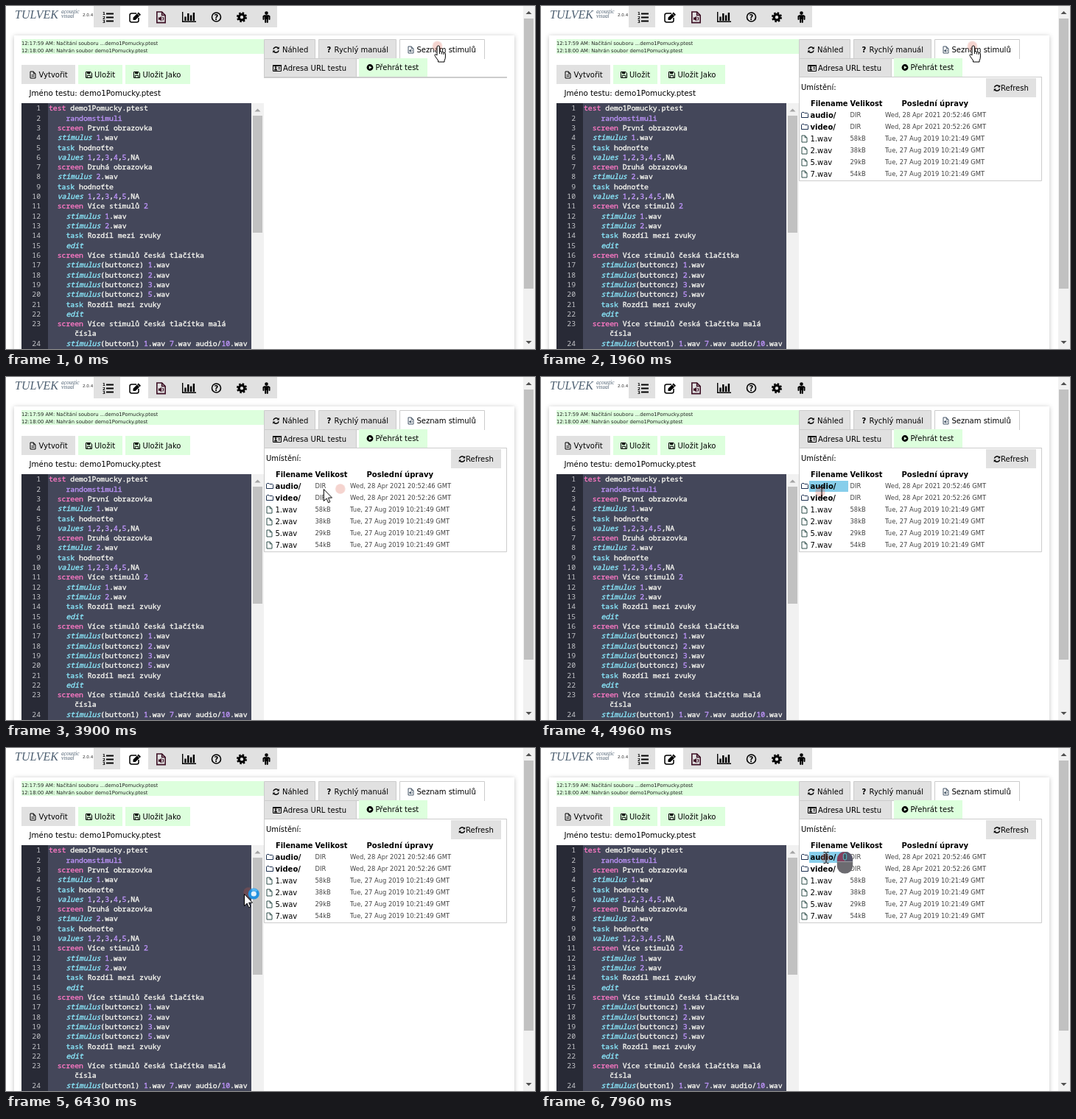
An HTML page that plays this animation: 718x466 px, repeating every 8 s.

```html
<!DOCTYPE html>
<html lang="cs">
<head>
<meta charset="utf-8">
<title>Seznam stimulů</title>
<style>
html, body { margin: 0; width: 100%; height: 100%; overflow: hidden; background: #fff; }
svg { display: block; width: 718px; height: 466px; font: 10px "DejaVu Sans", sans-serif; }
.log { font-size: 6.75px; fill: #222; }
.small { font-size: 8.38px; fill: #444; }
.bold { font-weight: bold; }
.brand { font-family: "Liberation Serif", serif; font-style: italic; fill: #4e6072; }
.code { font: 9.777px "Noto Sans Mono", monospace; color: #f8f8f2; }
.code text, .code tspan { fill: currentColor; stroke: currentColor; stroke-width: .35px; }
.code .num { color: #c4c5c9; stroke: none; text-anchor: end; }
.key { color: #ff79c6; }
.val { color: #bd93f9; }
.task { color: #8be9fd; }
.item { color: #8be9fd; font-style: italic; }
.line { fill: none; stroke: currentColor; }
.card { filter: drop-shadow(0 1px 3px rgba(0,0,0,.24)); }

.anim { animation: 8s linear infinite; }
.step { animation: 8s step-end infinite; }
#cursor { animation-name: cursor; }
#halo { animation-name: halo; }
#panel { animation-name: panel; }
#thumb { animation-name: thumb; }
#hand { animation-name: hand; }
#arrow { animation-name: arrow; }
#beam { animation-name: beam; }
#busy { animation-name: busy; }
#click { animation-name: click; }
#hotAudio { animation-name: hot-audio; }
#hotVideo { animation-name: hot-video; }

@keyframes cursor {
  0% { transform: translate(587px,54px); }
  34.5% { transform: translate(587px,54px); animation-timing-function: cubic-bezier(.35,.1,.3,1); }
  44.5%, 45.375% { transform: translate(573px,138px); }
  46.1% { transform: translate(555px,143px); }
  47% { transform: translate(518px,149px); }
  48.75% { transform: translate(431px,152px); }
  51% { transform: translate(396px,151px); }
  55.375%, 58.75% { transform: translate(380px,148px); }
  62% { transform: translate(381px,157px); }
  65.375%, 75.375% { transform: translate(384px,167px); }
  77.875% { transform: translate(362px,178px); }
  79.25% { transform: translate(340px,190px); }
  80.375% { transform: translate(323px,198px); }
  82%, 84.5% { transform: translate(317px,200px); }
  86% { transform: translate(345px,184px); }
  87.5% { transform: translate(375px,164px); }
  88.75% { transform: translate(384px,157px); }
  92%, 100% { transform: translate(387px,149px); }
}
@keyframes halo {
  0% { transform: translate(585.5px,54.5px); }
  34.5% { transform: translate(585.5px,54.5px); animation-timing-function: cubic-bezier(.4,.05,.35,1); }
  44.5%, 45.375% { transform: translate(575.5px,144px); }
  46.6% { transform: translate(555px,146px); }
  48.75% { transform: translate(454px,152px); }
  51% { transform: translate(405px,152px); }
  55.375%, 56.99% { transform: translate(378px,147px); }
  57%, 58.75% { transform: translate(380px,148px); }
  62% { transform: translate(379px,156px); }
  65.375%, 75.375% { transform: translate(384px,167px); }
  78.2% { transform: translate(364px,177px); }
  80.375% { transform: translate(329px,196px); }
  82%, 84.5% { transform: translate(317px,199px); }
  86.3% { transform: translate(343px,185px); }
  88.75% { transform: translate(380px,160px); }
  92%, 100% { transform: translate(386.5px,149px); }
}
@keyframes panel { 0% { visibility: hidden; } 24.5%, 100% { visibility: visible; } }
@keyframes thumb { 0%, 79.6%, 86.2% { fill: #c1c1c1; } 78.6%, 85.5% { fill: #a8a8a8; } }
@keyframes hand { 0% { visibility: visible; } 37%, 100% { visibility: hidden; } }
@keyframes arrow { 0%, 50%, 90.5%, 100% { visibility: hidden; } 37%, 77% { visibility: visible; } }
@keyframes beam { 0%, 77% { visibility: hidden; } 50%, 90.5%, 100% { visibility: visible; } }
@keyframes busy { 0%, 90.5%, 100% { visibility: hidden; } 77% { visibility: visible; } }
@keyframes click { 0%, 24.5% { visibility: hidden; } 6.25%, 99.5%, 100% { visibility: visible; } }
@keyframes hot-audio {
  0%, 50% { opacity: 0; } 53%, 62.5% { opacity: 1; }
  64.2%, 89.1% { opacity: 0; } 91.5%, 100% { opacity: 1; }
}
@keyframes hot-video {
  0%, 62.75% { opacity: 0; } 65%, 76.4% { opacity: 1; }
  78.5%, 87.3% { opacity: 0; } 88.75% { opacity: .7; } 90.5%, 100% { opacity: 0; }
}
</style>
</head>
<body>
<svg viewBox="0 0 718 466">
  <defs>
    <g id="refresh" class="line" stroke-width="1.5">
      <path d="M-3.6-.8A3.7 3.7 0 0 1 2.8-2.4M3.6.8A3.7 3.7 0 0 1-2.8 2.4"/>
      <path d="M4.3-4.2V-.9H1zM-4.3 4.2V.9H-1z" fill="currentColor" stroke="none"/>
    </g>
    <path id="page" class="line" d="M-3.5-4.5H.7L3.5-1.7V4.5H-3.5zM.7-4.5V-1.7H3.5"/>
    <path id="folder" class="line" d="M-4.5 3.5V-2.7L-3.7-3.5H-1L-.2-2.5H3.7L4.5-1.7V3.5z"/>
    <g id="save"><path class="line" d="M-4-4H2.3L4-2.3V4H-4zM-2.2 4V.8H2.2V4"/><path d="M-2.4-4H1.8V-1.2H-2.4z"/></g>
    <g id="textPage"><use href="#page"/><path class="line" stroke-width=".8" d="M-1.8.2H1.8M-1.8 2H1.8"/></g>
    <g id="soundPage"><use href="#page"/><path d="M-2.2.2H-1L.4-1V3.4L-1 2.2H-2.2z"/><path class="line" stroke-width=".7" d="M1.3-.2Q2.6 1.2 1.3 2.6"/></g>
  </defs>

  <!-- header -->
  <path d="M119 0H155V29H119zM193 0H368V29H193z" fill="#e1e1e1"/>
  <g class="brand">
    <text x="12" y="17" font-size="16">TULVEK</text>
    <text x="75" y="10" font-size="7.4">acoustic</text>
    <text x="75" y="15.5" font-size="7.4">visual</text>
  </g>
  <text x="104" y="14" font-size="5.6" fill="#333">2.0.4</text>
  <path class="line" stroke-width="2.2" d="M136 10.5H146M136 15.5H146M136 20.5H146"/>
  <g font-size="5.5" class="bold"><text x="131" y="12">1</text><text x="131" y="17.5">2</text><text x="131" y="23">3</text></g>
  <path class="line" stroke-width="1.5" d="M177 10H170.5Q168 10 168 12.5V19.5Q168 22 170.5 22H177.5Q180 22 180 19.5V16"/>
  <path d="M172.5 19V15.8L179.8 8.5 183 11.7 175.7 19z"/><path stroke="#fff" stroke-width=".8" d="M178 10.3L181.2 13.5"/>
  <g transform="translate(210.5 15.3) scale(1.62)" color="#3c1024" fill="#3c1024"><use href="#soundPage"/></g>
  <path class="line" stroke-width="1.4" d="M239.7 8V21.3H258"/>
  <path class="line" stroke-width="2.4" d="M243.5 20V14.5M247.3 20V10M251.1 20V12.5M254.9 20V9"/>
  <circle class="line" cx="285.5" cy="15" r="6" stroke-width="1.6"/>
  <text class="bold" x="285.5" y="18.7" text-anchor="middle">?</text>
  <circle class="line" cx="320" cy="15.2" r="3.8" stroke-width="3.2"/>
  <circle class="line" cx="320" cy="15.2" r="6" stroke-width="2" stroke-dasharray="2.5 2.212"/>
  <circle cx="353.5" cy="9.6" r="2.3"/>
  <path class="line" stroke-width="2" stroke-linecap="round" d="M349.5 14V18M357.5 14V18M352.2 14V22M354.8 14V22"/>
  <path d="M350 12.3H357L358.3 14.5H355.8V18H351.2V14.5H348.7z"/>

  <!-- card, log and buttons -->
  <rect class="card" x="11" y="40" width="679" height="440" fill="#fff"/>
  <path d="M21 45H350V65H21zM98 80H158V106H98zM162 80H250V106H162z" fill="#dfd"/>
  <path d="M21 80H94V106H21z" fill="#e1e1e1"/>
  <text class="log" x="21" y="53">12:17:59 AM: Načítání souboru ...demo1Pomucky.ptest</text>
  <text class="log" x="21" y="63">12:18:00 AM: Nahrán soubor demo1Pomucky.ptest</text>
  <use href="#textPage" x="36.5" y="93.5"/><text x="44.5" y="97">Vytvořit</text>
  <use href="#save" x="112.5" y="93.5"/><text x="120" y="97">Uložit</text>
  <use href="#save" x="177.5" y="93.5"/><text x="185.5" y="97">Uložit Jako</text>
  <text x="31.5" y="122" font-size="10.3">Jméno testu: demo1Pomucky.ptest</text>

  <!-- editor -->
  <path d="M21 132H334V466H21z" fill="#44475a"/>
  <path d="M21 132H57V466H21z" fill="#282a36"/>
  <g id="editor" class="code"></g>
  <path d="M333 132H350V466H333z" fill="#f1f1f1"/>
  <path d="M337.5 143.5H345.5L341.5 139.5z" fill="#a3a3a3"/>
  <rect id="thumb" class="step" x="335" y="149" width="13" height="159" fill="#c1c1c1"/>

  <!-- tabs -->
  <path d="M350 96H680V98H350z" fill="#ccc"/>
  <path d="M350.5 45.5H419.5V71.5H350.5zM424.5 45.5H529.5V71.5H424.5zM350.5 71.5H475.5V96.5H350.5z" fill="#e1e1e1" stroke="#ccc"/>
  <path d="M534.5 72V45.5H649.5V72" fill="#fff" stroke="#ccc"/>
  <path d="M479 71H572V96H479z" fill="#dfd"/>
  <use href="#refresh" x="366.5" y="59.5"/><text x="375" y="63">Náhled</text>
  <text class="bold" x="435.5" y="63">?</text><text x="445.5" y="63">Rychlý manuál</text>
  <g color="#456" fill="#456"><use href="#soundPage" x="549.5" y="59.5"/></g>
  <text x="557.5" y="63">Seznam stimulů</text>
  <path class="line" d="M362.5 80.5H373.5V88.5H362.5zM369.5 83.5H372M369.5 85.5H372"/>
  <circle cx="366" cy="83.5" r="1.3"/><path d="M363.8 87.5Q364 85 366 85T368.2 87.5zM362 80H374V82H362z"/>
  <text x="376" y="88">Adresa URL testu</text>
  <circle cx="494" cy="83.5" r="4.4"/><path d="M492.7 81.2L496.7 83.5 492.7 85.8z" fill="#dfd"/>
  <text x="501.5" y="87">Přehrát test</text>

  <!-- stimulus list -->
  <g id="panel" class="step">
    <path d="M350.5 96.5H679.5V237.5H350.5z" fill="#fff" stroke="#ccc"/>
    <path d="M604 98H672V124H604z" fill="#e1e1e1"/>
    <use href="#refresh" x="619" y="111.5"/><text x="624" y="115">Refresh</text>
    <text x="353" y="114">Umístění:</text>
    <g class="bold">
      <text x="366" y="136" font-size="9.8">Filename</text>
      <text x="419.5" y="136" font-size="9.8">Velikost</text>
      <text x="489.5" y="136">Poslední úpravy</text>
    </g>
    <path id="hotAudio" class="anim" d="M364 141H417V156H364z" fill="#87ceeb"/>
    <path id="hotVideo" class="anim" d="M364 157H417V172H364z" fill="#87ceeb"/>
    <g id="files"></g>
  </g>

  <!-- page scrollbar -->
  <path d="M702 0H718V466H702z" fill="#f1f1f1"/>
  <path d="M703 17H716V384H703z" fill="#c1c1c1"/>
  <path d="M705.5 11H713.5L709.5 7zM705.5 455H713.5L709.5 459z" fill="#505050"/>

  <!-- pointer -->
  <g id="halo" class="anim"><circle r="6.7" fill="#d85a46" opacity=".26"/></g>
  <g id="cursor" class="anim" stroke-linejoin="round">
    <g id="hand" class="step" fill="#fff" stroke="#000">
      <path d="M-2 2Q-2 0-.2 0T1.6 2V8Q3.2 6.5 4.4 8.5 5.8 7.3 7 9.3 9.4 8.6 9.4 11V15Q9.4 18 8 20V22H-.5V20L-4.4 14.5Q-5.6 12.5-4.5 11.7-3.4 11-2 13z"/>
      <path fill="none" d="M1.6 7.5V11M4.4 8.5V11.5M7 9.3V12"/>
    </g>
    <path id="arrow" class="step" d="M.5.5V16.5L4.2 13 6.6 18.7 9 17.7 6.6 12.1H11.6z" fill="#fff" stroke="#000"/>
    <g id="beam" class="step">
      <path class="line" d="M-3.5-7.5H-1L0-6.5 1-7.5H3.5M0-6.5V6.5M-3.5 7.5H-1L0 6.5 1 7.5H3.5"/>
    </g>
    <g id="busy" class="step" fill="none">
      <circle cx="13.3" cy="0" r="5.6" fill="#e4f2fc" stroke="#2391e0" stroke-width="4"/>
      <path d="M10.5-4.8A5.6 5.6 0 0 1 17.5-3.7" stroke="#58b8f4" stroke-width="3"/>
    </g>
    <g id="click" class="step">
      <rect x="14.8" y="-8" width="21.4" height="29.5" rx="10" fill="#6c6b70"/>
      <path d="M25 5H15V2A10 10 0 0 1 25-8z" fill="#84405f"/>
      <path d="M26 5H36V2A10 10 0 0 0 26-8z" fill="#57566a"/>
      <path d="M15 5.5H36" stroke="#9b9ba2"/>
      <rect x="23.3" y="-5.5" width="4.4" height="8.5" rx="2.2" fill="#40515c" stroke="#59c3cf"/>
    </g>
  </g>
</svg>
<script>
const CHAR = 5.867, ROW = 13.31, TOP = 142.3;
const values = "  values 1,2,3,4,5,NA";
const source = [
  "test demo1Pomucky.ptest", "    randomstimuli",
  "  screen První obrazovka", "  stimulus 1.wav", "  task hodnoťte", values,
  "  screen Druhá obrazovka", "  stimulus 2.wav", "  task hodnoťte", values,
  "  screen Více stimulů 2", "    stimulus 1.wav", "    stimulus 2.wav",
  "    task Rozdíl mezi zvuky", "    edit",
  "  screen Více stimulů česká tlačítka",
  ...[1, 2, 3, 5].map(n => `    stimulus(buttoncz) ${n}.wav`),
  "    task Rozdíl mezi zvuky", "    edit",
  "  screen Více stimulů česká tlačítka malá\n      čísla",
  "    stimulus(button1) 1.wav 7.wav audio/10.wav"
];
const kinds = { test: "key", screen: "key", randomstimuli: "val", task: "task",
  stimulus: "item", values: "item", edit: "item" };

const text = (x, y, body, cls = "") => `<text x="${x}" y="${y}" class="${cls}">${body}</text>`;

function highlight(line) {
  const [, word, rest] = line.match(/^(\S*?)(?=[\s(]|$)(.*)$/);
  const span = (cls, s) => `<tspan class="${cls}">${s}</tspan>`;
  if (!kinds[word]) return line;
  return span(kinds[word], word) + rest.replace(/(^|[\s,/])(\d+)/g, (m, gap, n) => gap + span("val", n));
}

let row = 0, code = "";
source.forEach((entry, i) => {
  code += text(47, TOP + row * ROW, i + 1, "num");
  for (const line of entry.split("\n")) {
    const body = line.trimStart();
    code += text(58 + (line.length - body.length) * CHAR, TOP + row++ * ROW, highlight(body));
  }
});
document.getElementById("editor").innerHTML = code;

const files = [
  ["audio/", "DIR", "46"], ["video/", "DIR", "26"],
  ["1.wav", "58kB"], ["2.wav", "38kB"], ["5.wav", "29kB"], ["7.wav", "54kB"]
];
document.getElementById("files").innerHTML = files.map(([name, size, sec], i) => {
  const y = 152 + i * 16;
  const date = sec ? `Wed, 28 Apr 2021 20:52:${sec} GMT` : "Tue, 27 Aug 2019 10:21:49 GMT";
  const icon = sec ? `<g color="#1c3050"><use href="#folder" x="358" y="${y - 4}"/></g>`
    : `<g color="#2f4f4a"><use href="#page" x="357.5" y="${y - 3.5}"/></g>`;
  return icon + text(365.5, y, name, sec ? "bold" : "") +
    text(419.5, y - 1, size, "small") + text(467, y - 1, date, "small");
}).join("");
</script>
</body>
</html>
```
